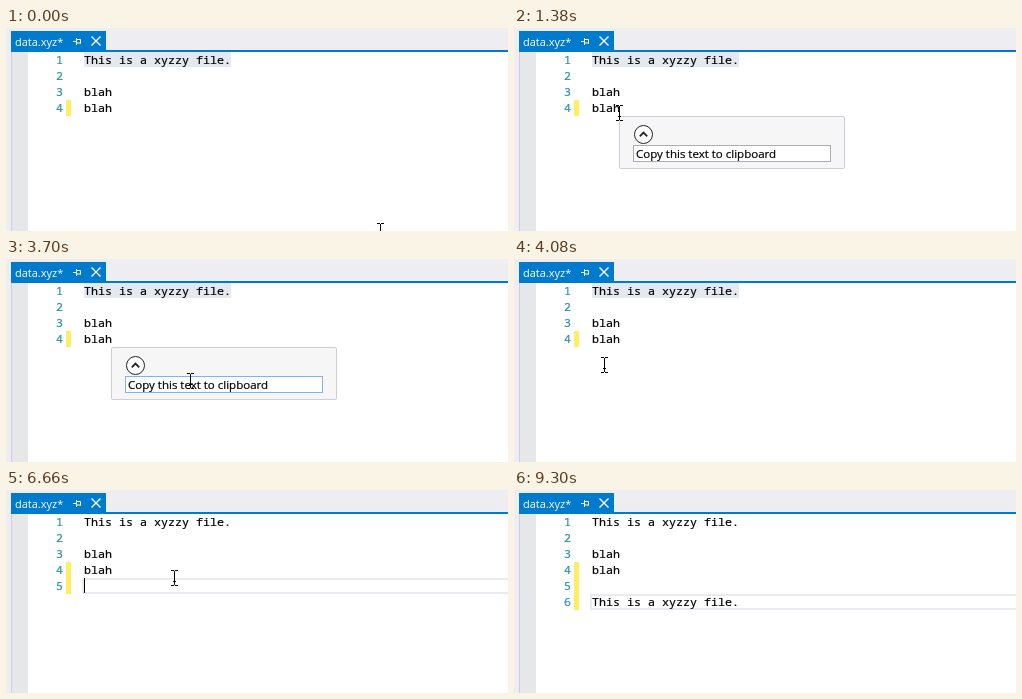
Animation of 502x203 px, one loop 9.47 s. Source, as an HTML page:

```html
<!DOCTYPE html>
<html lang="en">
<head>
<meta charset="utf-8">
<title>Editor tooltip</title>
<style>
html, body { margin: 0; width: 100%; height: 100%; overflow: hidden; background: #fff; }
svg { display: block; width: 502px; height: 203px; }
.code { font: 11.667px "Noto Sans Mono", "DejaVu Sans Mono", monospace; stroke: #000; stroke-width: .2; }
.num { fill: #2b91af; stroke: #2b91af; }
.ui { font-family: "Open Sans", "Noto Sans", sans-serif; }
</style>
</head>
<body>
<svg viewBox="0 0 502 203">
  <rect width="502" height="203" fill="#fff"/>
  <path d="M0 0H502V22H5V203H0Z" fill="#eeeef2"/>
  <rect x="5" y="24" width="17" height="179" fill="#e6e7e8"/>
  <rect x="5" y="24" width="1" height="179" fill="#cccedb"/>
  <path d="M5 3H100V22H502V24H5Z" fill="#007acc"/>
  <text class="ui" x="9" y="17.5" font-size="11" fill="#fff">data.xyz*</text>
  <g fill="none" stroke="#fff">
    <path d="M67 13.5H70M70.5 10V17M71 11.5H74.5V15.5M71 15H75"/>
    <path d="M85.5 8.5L94.5 17.5M94.5 8.5L85.5 17.5" stroke-width="1.4"/>
  </g>

  <rect id="selection" x="78" y="24" width="147" height="15" fill="#e4e9ef"/>
  <rect id="current" x="77" width="440" height="14" fill="none" stroke="#eaeaf2" stroke-width="2"/>
  <rect id="changed" x="60" y="72" width="5" fill="#ffee62"/>
  <g id="lines"></g>
  <rect id="caret" width="1" height="15"/>

  <g id="popup">
    <rect x="105.5" y="88.5" width="225" height="52" rx="1.5" fill="#f6f6f6" stroke="#cccedb"/>
    <circle cx="129.5" cy="106.5" r="9" fill="#fff" stroke="#222"/>
    <path d="M125.8 108.3L129.5 104.6L133.2 108.3" fill="none" stroke="#222" stroke-width="1.8"/>
    <rect id="box" x="119.5" y="117.5" width="197" height="16" fill="#fff"/>
    <text class="ui" x="122" y="130" font-size="11.53" stroke="#000" stroke-width=".2">Copy this text to clipboard</text>
  </g>

  <path id="beam" d="M-3 .5H0M1 .5H4M.5 1V15M-3 15.5H0M1 15.5H4M-1 11.5H2" fill="none" stroke="#000"/>
  <path id="arrow" d="M.5 .5V16.5L4.2 13L6.7 18.5L9 17.5L6.6 12H11.5Z" fill="#fff" stroke="#000"/>
</svg>
<script>
const LOOP = 9470;
const ROW = 16, TOP = 24, LEFT = 78, CHAR = 7;
const SAMPLE = 77;   // time between pointer steps
const BLINK = 533;   // caret on or off time
const CLICK = 4630, CLICK_END = 5560;
const SVG = "http://www.w3.org/2000/svg";

const $ = id => document.getElementById(id);
const set = (el, attrs) => { for (const k in attrs) el.setAttribute(k, attrs[k]); };
const show = (el, on) => el.setAttribute("visibility", on ? "visible" : "hidden");
const rowY = row => TOP + row * ROW;
const smooth = p => p * p * (3 - 2 * p);

const sentence = "This is a xyzzy file.";
const edits = [
  [0, sentence + "\n\nblah\nblah"],
  [6660, "\n"],
  [6810, "\n"],
  [7440, sentence]
];
const textAt = t => edits.filter(([at]) => t >= at).map(e => e[1]).join("").split("\n");

// Pointer glides: start, end, x, y
const glides = [
  [0, 0, 374, 195],
  [70, 610, 107, 67],
  [760, 920, 103, 75],
  [1380, 1380, 105, 77],
  [1455, 2230, 227, 122],
  [3540, 4080, 90, 98],
  [5180, 5400, 184, 85],
  [5480, 5560, 164, 82],
  [5880, 5880, 168, 80],
  [8600, 8750, 36, 124],
  [8830, 8980, 308, 210]
];

function pointerAt(t) {
  let x = 0, y = 0;
  for (const [start, end, toX, toY] of glides) {
    if (t < start) break;
    const count = Math.round((end - start) / SAMPLE) + 1;
    const gap = (end - start) / (count - 1) || 1;
    const step = Math.min(Math.floor((t - start) / gap + 1e-6) + 1, count);
    const p = smooth(step / count);
    x = Math.round(x + (toX - x) * p);
    y = Math.round(y + (toY - y) * p);
  }
  return [x, y];
}

function addText(cls, x, row, str) {
  const el = document.createElementNS(SVG, "text");
  set(el, { class: cls, x, y: rowY(row) + 12 });
  el.textContent = str;
  $("lines").append(el);
  return el;
}

const lines = textAt(LOOP).map((_, i) => ({
  num: addText("code num", 50, i, i + 1),
  text: addText("code", LEFT, i, "")
}));

function drawEditor(t) {
  const doc = textAt(t);
  lines.forEach(({ num, text }, i) => {
    show(num, i < doc.length);
    text.textContent = doc[i] || "";
  });

  const row = doc.length - 1;
  const focused = t >= CLICK;
  show($("selection"), !focused);
  show($("current"), focused);
  set($("current"), { y: rowY(row) + 1 });
  set($("changed"), { height: (row - 2) * ROW });

  const atEnd = t >= CLICK_END;
  const phase = (t - (atEnd ? CLICK_END : CLICK)) % (2 * BLINK);
  const col = atEnd ? doc[row].length : 2;
  show($("caret"), focused && phase < BLINK);
  set($("caret"), { x: LEFT + col * CHAR, y: rowY(row) });
}

function drawPointer(t) {
  const [x, y] = pointerAt(t);
  const hot = y + 8;
  const inside = (l, r, top, bottom) => x > l && x < r && hot > top && hot < bottom;

  const popup = t >= 760 && t < 4080;
  const overBox = popup && inside(119, 317, 117, 134);
  const arrow = popup && !overBox && inside(105, 331, 88, 141);
  show($("popup"), popup);
  set($("box"), { stroke: overBox ? "#7eb4ea" : "#abadb3" });
  show($("beam"), !arrow);
  show($("arrow"), arrow);
  set($("beam"), { transform: `translate(${x} ${y})` });
  set($("arrow"), { transform: `translate(${x} ${hot})` });
}

const start = performance.now();
function tick() {
  const t = (performance.now() - start) % LOOP;
  drawEditor(t);
  drawPointer(t);
  requestAnimationFrame(tick);
}
tick();
</script>
</body>
</html>
```
